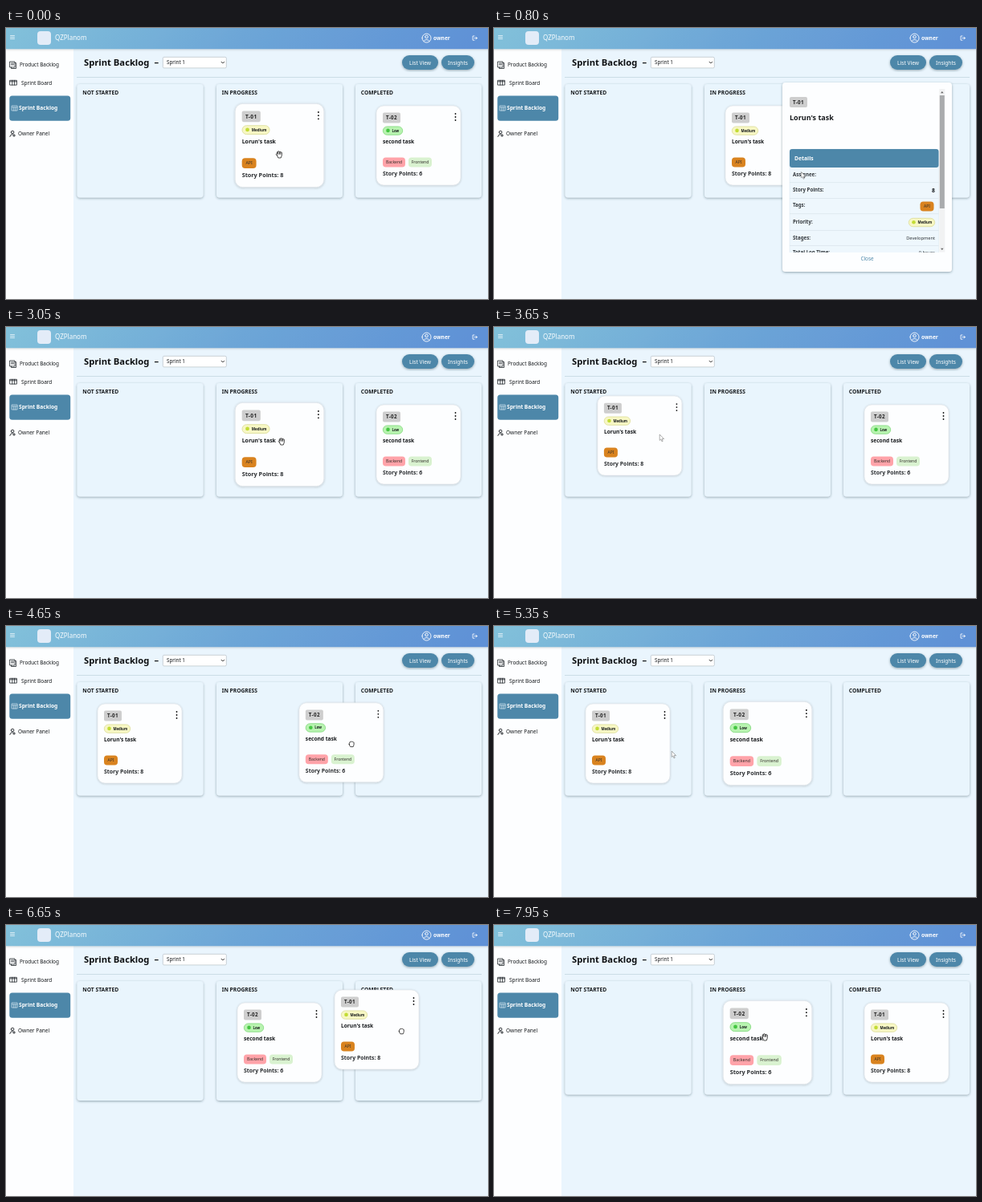
These frames come from a looping animation (600x338 px, 8 s). An HTML page:

```html
<!DOCTYPE html>
<html lang="en">
<head>
<meta charset="utf-8">
<title>Sprint board</title>
<style>
  html, body { margin: 0; width: 100%; height: 100%; overflow: hidden; }
  svg { display: block; width: 100%; height: 100%; font-family: "Noto Sans", "Open Sans", sans-serif; }
  text { white-space: pre; }
  .b { font-weight: 700; }
  .m { font-weight: 500; }
</style>
</head>
<body>
<svg id="stage" viewBox="0 0 600 338">
  <defs>
    <linearGradient id="bar" x1="0" y1="0" x2="1" y2="0.04">
      <stop offset="0" stop-color="#82c1da"/>
      <stop offset="0.5" stop-color="#6da6d7"/>
      <stop offset="1" stop-color="#5f91d6"/>
    </linearGradient>
    <filter id="soft" x="-10%" y="-10%" width="120%" height="125%">
      <feDropShadow dx="0" dy="1" stdDeviation="1.5" flood-color="#27414f" flood-opacity="0.45"/>
    </filter>
    <filter id="faint" x="-10%" y="-10%" width="120%" height="125%">
      <feDropShadow dx="0" dy="0.6" stdDeviation="1.3" flood-color="#333" flood-opacity="0.28"/>
    </filter>
    <clipPath id="view"><rect x="362" y="76" width="192" height="204"/></clipPath>
  </defs>
</svg>
<script>
const LOOP = 8000;
const BLUE = '#4d87a9';
const stage = document.getElementById('stage');

const rect = (x, y, w, h, fill, r = 0, extra = '') =>
  `<rect x="${x}" y="${y}" width="${w}" height="${h}" rx="${r}" fill="${fill}" ${extra}/>`;
const label = (x, y, size, str, fill = '#16191c', extra = '') =>
  `<text x="${x}" y="${y}" font-size="${size}" fill="${fill}" ${extra}>${str}</text>`;
const bold = (x, y, size, str, fill, extra = '') => label(x, y, size, str, fill, `class="b" ${extra}`);
const line = (d, stroke, width = 0.8, fill = 'none') =>
  `<path d="${d}" stroke="${stroke}" stroke-width="${width}" fill="${fill}" stroke-linejoin="round" stroke-linecap="round"/>`;
const MID = 'text-anchor="middle"';
const END = 'text-anchor="end"';

// Shared small parts
const PRIORITY = {
  Medium: { w: 33, fill: '#f7f7c4', edge: '#d8d98f', dot: '#c3dc35' },
  Low: { w: 25, fill: '#b8f3b0', edge: '#74d470', dot: '#45c642' }
};
function pill(x, y, name) {
  const p = PRIORITY[name];
  return rect(x + 0.3, y + 0.3, p.w - 0.6, 10.4, p.fill, 5.2, `stroke="${p.edge}" stroke-width="0.7"`) +
    `<circle cx="${x + 6.5}" cy="${y + 5.3}" r="2.3" fill="${p.dot}"/>` +
    bold(x + 11.5, y + 7, 4.3, name);
}
const TAGS = { API: [17, '#d9831f'], Backend: [28, '#ffa3a9'], Frontend: [29, '#d9f2d0'] };
function tag(x, y, name) {
  const [w, fill] = TAGS[name];
  return rect(x, y, w, 12, fill, 3.8) + label(x + w / 2, y + 7.8, 5, name, '#33302c', MID);
}
const badge = (x, y, id) => rect(x, y, 22, 13, '#cecece', 2) +
  bold(x + 11, y + 8.8, 6.2, id, '#222', MID + ' letter-spacing="0.4"');

function card(id, priority, title, tags, points) {
  let x = 8;
  const tagRow = tags.map(name => {
    const part = tag(x, 64.5, name);
    x += TAGS[name][0] + 4;
    return part;
  }).join('');
  const dots = [10, 14, 18].map(y => `<circle cx="98.5" cy="${y}" r="0.9" fill="#111"/>`).join('');
  return rect(0, 0, 105, 99, '#fdfeff', 9, 'filter="url(#faint)" stroke="#dadfe2" stroke-width="0.5"') +
    badge(8, 8.6, id) + dots + pill(8, 25.6, priority) + bold(8, 47.3, 6.6, title) +
    tagRow + bold(8, 87.3, 6.9, 'Story Points: ' + points, '#2a2d30');
}

function header() {
  return rect(0, 0, 600, 26.2, 'url(#bar)', 0, 'filter="url(#faint)"') +
    line('M5.5 9.5h5M5.5 11.5h5M5.5 13.5h5', '#eef7fc', 0.8) +
    rect(39, 4, 17, 17, '#e3ecf8', 4) +
    label(61, 15.3, 8, 'QZPlanom', '#f8fcfe', 'class="m"') +
    line('M518 12.6a5.5 5.5 0 1 0 11 0a5.5 5.5 0 1 0 -11 0M521.7 11a1.8 1.8 0 1 0 3.6 0a1.8 1.8 0 1 0 -3.6 0M520 16.4q3.5 -4 7 0', '#fff', 0.9) +
    bold(532, 15, 6.6, 'owner', '#fff') +
    line('M583 10h-2v5.2h2M583 12.6h3.4M585 11.2l1.5 1.4l-1.5 1.4', '#fff', 0.8);
}

function sidebar() {
  const ink = '#23282c';
  return rect(0, 25.5, 84, 312.5, '#fdfeff') +
    line('M5 42h6v7h-6zM6.5 49v1.5h6v-7h-1.5M6.5 44h3M6.5 45.8h3', ink, 0.8) +
    label(17, 48.3, 6.4, 'Product Backlog') +
    line('M5 65.3h8.4v5.8h-8.4zM7.8 65.3v5.8M10.6 65.3v5.8M5 66.8h8.4', ink, 0.8) +
    label(19, 70.5, 6.5, 'Sprint Board') +
    rect(4.3, 84.4, 75.9, 31.4, BLUE, 3.5) +
    line('M7.5 97h6.6v6h-6.6zM7.5 99h6.6M9.7 99v4M11.9 99v4', '#d5e7f1', 0.7) +
    bold(16, 102.4, 6.65, 'Sprint Backlog', '#fff') +
    line('M6.3 130a1.8 1.8 0 1 0 3.6 0a1.8 1.8 0 1 0 -3.6 0M4.8 135.5q.4 -3 3.3 -3M10 132.5v3M8.5 134h3', ink, 0.9) +
    label(15, 134.3, 6.5, 'Owner Panel');
}

function toolbar() {
  const button = (x, w, str) => rect(x, 34, w, 18, BLUE, 9, 'filter="url(#soft)"') +
    label(x + w / 2, 45.5, 6.6, str, '#fff', MID);
  return bold(97, 46.8, 11.2, 'Sprint Backlog', '#0d0f11') + bold(184.5, 46.8, 11.2, '–', '#0d0f11') +
    rect(195.3, 36.3, 79, 13.6, '#fff', 1.5, 'stroke="#a9b4bb" stroke-width="0.6"') +
    label(200, 45.4, 6.3, 'Sprint 1') +
    line('M268 42.2l1.8 1.8l1.8 -1.8', '#222', 0.9) +
    button(493, 45, 'List View') + button(542, 41, 'Insights') +
    rect(88, 61, 504, 0.8, '#c3d7e2');
}

function columns() {
  return [['NOT STARTED', 88.5], ['IN PROGRESS', 262], ['COMPLETED', 435]].map(([name, x]) =>
    rect(x, 70, 157, 141.5, '#e9f5fd', 4, 'class="col" filter="url(#soft)"') +
    bold(x + 6.8, 83.4, 6.7, name)).join('');
}

function modal() {
  const rows = [['Assignee:', 117], ['Story Points:', 135.5], ['Tags:', 155], ['Priority:', 176],
    ['Stages:', 195.5], ['Total Log Time:', 214], ['Accumulation Of Effort:', 232]];
  const cuts = [124.5, 144, 163.5, 184, 203, 221.5];
  const content =
    badge(368, 18, 'T-01') + bold(368, 47, 9, "Lorun's task") +
    rect(368, 83, 185.5, 162, '#eef7fd', 4, 'stroke="#dbe7ee" stroke-width="0.5"') +
    rect(368, 83, 185.5, 23, BLUE, 3) + bold(374, 97, 6.8, 'Details', '#fff') +
    rows.map(([str, y]) => bold(372, y, 6.1, str, '#34393d')).join('') +
    cuts.map(y => rect(368, y, 185.5, 0.6, '#d5e1e8')).join('') +
    bold(549, 137, 6.8, '8', '#16191c', END) +
    tag(530.5, 148.5, 'API') + pill(516, 169, 'Medium') +
    label(549, 195.5, 5.7, 'Development', '#34393d', END) +
    label(549, 214, 5.7, '0 hours', '#34393d', END) +
    rect(525, 225.5, 24, 15.5, BLUE, 4) + label(537, 235.3, 5.6, 'Show', '#fff', MID) +
    rect(368, 254.5, 185.5, 20.5, BLUE, 3) + bold(372, 266, 7.6, 'Edit History ▼', '#fff');
  return rect(359, 68, 211, 236, '#fdfeff', 4, 'filter="url(#soft)"') +
    `<g clip-path="url(#view)"><g id="content">${content}</g></g>` +
    rect(554.3, 76, 7, 203.5, '#f1f2f3') +
    `<path d="M556 81.3l1.8 -2.2l1.8 2.2zM556 274.7l1.8 2.2l1.8 -2.2z" fill="#666"/>` +
    rect(554.8, 84, 6, 141, '#a9abad', 0, 'id="thumb"') +
    label(464.5, 290, 6.4, 'Close', BLUE, MID);
}

const CURSORS = {
  arrow: line('M-1.8 -3.6v7l1.6 -1.4l1.2 2.8l1.2 -.5l-1.2 -2.7h2.2z', '#777', 0.6, '#fff'),
  open: line('M-2.6 2l-1.2 -1.7q.5 -1.3 1.6 0l-.7 -2.2q.7 -1.2 1.4 0q-.1 -1.6 .9 -1.5q.9 0 .9 1.2q1 -1.3 1.6 .2q1.2 -.7 1.5 .6q.3 3.8 -1.2 6.4h-3.4q-.5 -1.5 -1.4 -3zM-1.4 -1.6l.4 1.9M.4 -2v2.2M1.9 -1.6l-.2 1.9', '#111', 0.75, '#fff'),
  grab: line('M-2.6 .9q-.8 -1.6 .6 -1.7q-.3 -1.6 1 -1.6q.9 -.9 1.6 0q1 -.6 1.5 .4q1.2 -.2 1.2 1q.2 2.8 -1 4.8h-3.4q-1 -1.2 -1.5 -2.9z', '#111', 0.75, '#fff')
};

stage.insertAdjacentHTML('beforeend',
  rect(0, 0, 600, 338, '#eaf5fd') + sidebar() + header() + toolbar() + columns() +
  `<g id="second">${card('T-02', 'Low', 'second task', ['Backend', 'Frontend'], 6)}</g>` +
  `<g id="first">${card('T-01', 'Medium', "Lorun's task", ['API'], 8)}</g>` +
  `<g id="modal">${modal()}</g>` +
  `<g id="cursor">${Object.entries(CURSORS).map(([k, d]) => `<g id="${k}">${d}</g>`).join('')}</g>`);

const el = id => document.getElementById(id);
const cols = [...document.querySelectorAll('.col')];

// Timing helpers
const clamp = v => Math.max(0, Math.min(1, v));
const ramp = (t, start, span) => clamp((t - start) / span);
const ease = k => k * k * (3 - 2 * k);
const mix = (a, b, k) => a + (b - a) * k;
const within = (t, spans) => spans.some(([a, b]) => t >= a && t < b);

// Pointer path: time, x, y
const PATH = [
  [0, 340, 157], [350, 338, 150], [500, 338, 150], [950, 400, 195], [1600, 430, 235], [1850, 425, 240],
  [2400, 464, 287], [2650, 464, 287], [3000, 344, 143], [3050, 343, 142], [3200, 367, 149],
  [3600, 210, 138], [3650, 208, 138], [4250, 526, 148], [4400, 526, 148], [4850, 362, 146],
  [5200, 338, 148], [5350, 223, 160], [5600, 197, 148], [5800, 197, 148], [6600, 488, 131],
  [6650, 492, 132], [6800, 508, 143], [7250, 512, 145], [7800, 337, 139], [8000, 337, 139]
];
function pointer(t) {
  const i = PATH.findIndex(p => p[0] > t);
  const [a, b] = [PATH[i - 1], PATH[i]];
  const k = ease((t - a[0]) / (b[0] - a[0]));
  return [mix(a[1], b[1], k), mix(a[2], b[2], k)];
}

const SLOT = { todo: 114, doing: 288, done: 461 };
const TOP = 97;
// Each drag: pick-up time, release time, start and end column
const FIRST = { home: 'doing', drags: [[3200, 3640, 'doing', 'todo'], [5780, 6700, 'todo', 'done']],
  hover: [[-200, 450], [2800, 3200], [5450, 5780], [7020, 7420]] };
const SECOND = { home: 'done', drags: [[4400, 4850, 'done', 'doing']],
  hover: [[4120, 4400], [4950, 5350], [7580, 8400]] };
const DROP = 300;

function place(task, t) {
  let x = SLOT[task.home], y = TOP;
  for (const [grab, release, from, to] of task.drags) {
    if (t < grab) break;
    const [gx, gy] = pointer(grab);
    const [px, py] = pointer(Math.min(t, release + 10));
    const k = 1 - (1 - ramp(t, release + 10, DROP)) ** 2;
    x = mix(SLOT[from] + px - gx, SLOT[to], k);
    y = mix(TOP + py - gy, TOP, k);
  }
  return [x, y];
}
function setCard(id, task, t) {
  const [x, y] = place(task, t);
  const grow = Math.max(...task.hover.map(([a, b]) => ease(ramp(t, a, 180)) * (1 - ease(ramp(t, b, 150)))));
  el(id).setAttribute('transform',
    `translate(${x + 52.5} ${y + 49.5}) scale(${1 + 0.052 * grow}) translate(-52.5 -49.5)`);
}

const GRABBED = [[3180, 3620], [4380, 4850], [5760, 6700]];
const OVER = [[0, 520], [2880, 3180], [4120, 4380], [4850, 5270], [5480, 5760], [6700, 7400], [7600, 8000]];

function draw(t) {
  setCard('first', FIRST, t);
  setCard('second', SECOND, t);

  const height = within(t, [[3350, 3620], [6050, 6700]]) ? 149 : 141.5;
  cols.forEach(c => c.setAttribute('height', height));

  const shown = ramp(t, 450, 120) * (1 - ramp(t, 2650, 120));
  el('modal').setAttribute('opacity', shown);
  const scroll = ease(ramp(t, 1000, 550));
  el('content').setAttribute('transform', `translate(0 ${68 * (1 - scroll)})`);
  el('thumb').setAttribute('y', 84 + 46 * scroll);

  const [x, y] = pointer(t);
  el('cursor').setAttribute('transform', `translate(${x} ${y})`);
  const kind = within(t, GRABBED) ? 'grab' : within(t, OVER) ? 'open' : 'arrow';
  for (const k in CURSORS) el(k).setAttribute('visibility', k === kind ? 'visible' : 'hidden');
}

const begin = performance.now();
function tick(now) {
  draw(Math.max(0, now - begin) % LOOP);
  requestAnimationFrame(tick);
}
draw(0);
requestAnimationFrame(tick);
</script>
</body>
</html>
```
